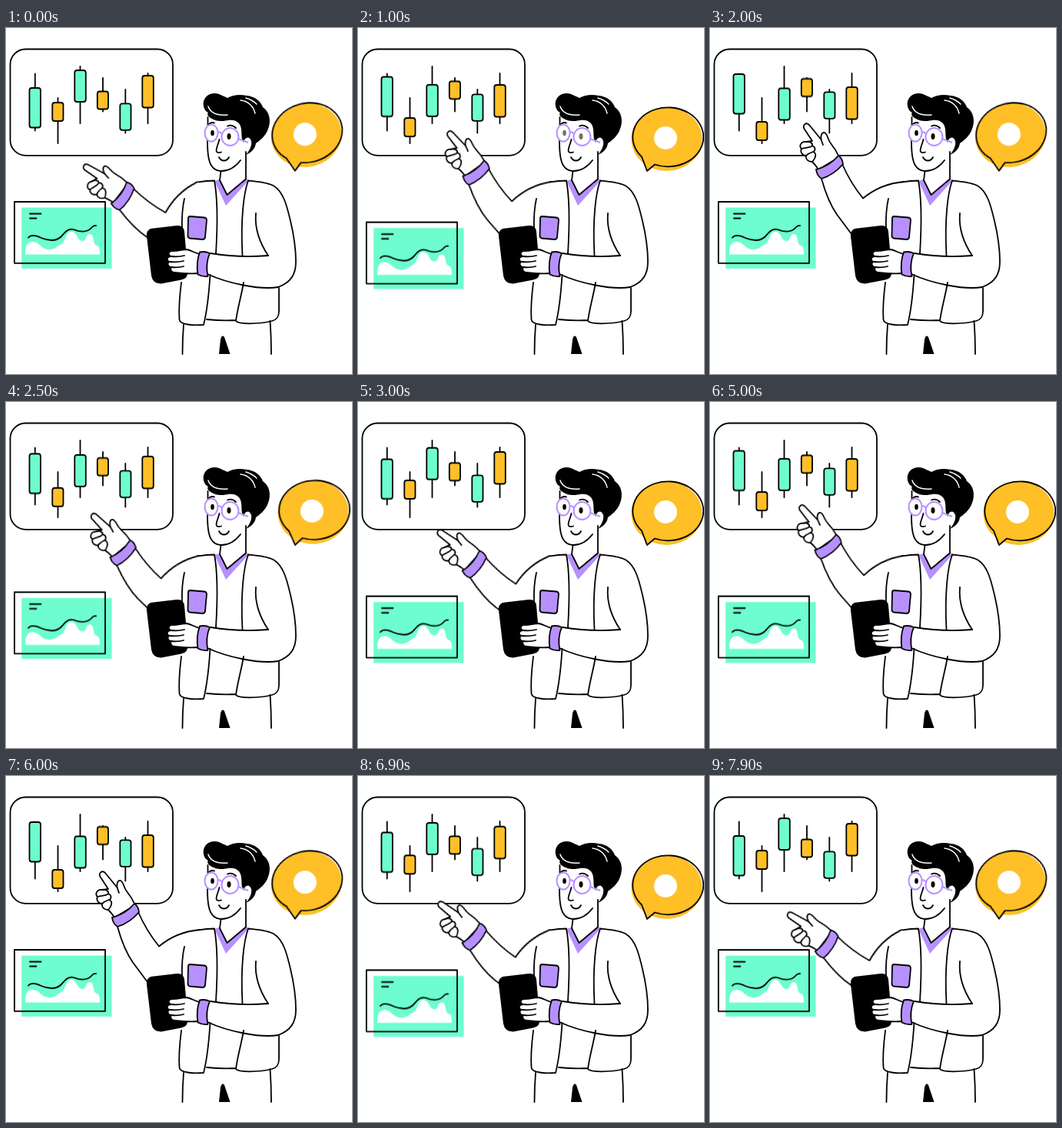
Write an HTML page that moves like this. It is 450 by 450 pixels and loops after 8000 ms.

```html
<!DOCTYPE html>
<html lang="en">
<head>
<meta charset="utf-8">
<title>Market analyst</title>
<style>
html, body { margin: 0; width: 100%; height: 100%; overflow: hidden; background: #fff; }
svg { display: block; width: 100%; height: 100%; }
.ink { fill: none; stroke: #000; stroke-width: 1.8; stroke-linecap: round; stroke-linejoin: round; }
.paper { fill: #fff; }
.green { fill: #6dfdcf; }
.gold { fill: #ffbf27; }
.lilac { fill: #b790ff; }
.rim { fill: none; stroke: #b790ff; stroke-width: 2; }
.shine { fill: none; stroke: #fff; stroke-width: 1.5; stroke-linecap: round; }

.body { animation: slide 4s ease infinite; }
.arm { animation: point 4s ease infinite; transform-origin: 251px 209px; }
.chart { animation: bob 2s ease infinite; }
.bubble { animation: sway 2s ease infinite; transform-origin: 375px 186px; }
.eyes { animation: blink 8s linear infinite; }

@keyframes slide { 50% { transform: translateY(var(--d)); } }
@keyframes point { 0%, 100% { transform: rotate(-22deg); } 50% { transform: none; } }
@keyframes bob { 50% { transform: translateY(26.6px); } }
@keyframes sway { 0%, 100% { transform: rotate(-14deg); } 50% { transform: none; } }
@keyframes blink { 0%, 11.3%, 13.7%, 100% { opacity: 1; } 12.5% { opacity: .55; } }
</style>
</head>
<body>
<svg viewBox="0 0 450 450">
  <rect class="ink" x="5.5" y="27.5" width="211.5" height="138.3" rx="20"/>

  <g class="ink">
    <path d="M37.8 59.5V133.5M67.5 91V150M96.5 50V124M126 65V108.5M155.3 80V136.5M184.5 59V124"/>
    <rect class="body green" style="--d:-18px" x="30.5" y="78" width="14.5" height="51.5" rx="3"/>
    <rect class="body gold" style="--d:25px" x="60.3" y="97" width="14.2" height="24" rx="3"/>
    <rect class="body green" style="--d:23.5px" x="89.3" y="55" width="14.5" height="41" rx="3"/>
    <rect class="body gold" style="--d:-16.5px" x="118.8" y="82.5" width="14.2" height="23" rx="3"/>
    <rect class="body green" style="--d:-15px" x="148.3" y="98.3" width="14.2" height="34.5" rx="3"/>
    <rect class="body gold" style="--d:15px" x="177.3" y="62" width="14.5" height="41.500" rx="3"/>
  </g>

  <g class="chart">
    <rect class="green" x="20.3" y="233.5" width="117.2" height="79.3"/>
    <path class="paper" d="M25 294.5V290C26 281 30 277 36 278C44 279 46 288 56 288C64 288 66 284 72 281C79 276 77 265 85 265C93 265 92 277 100 277C105 277 103 268 109 268C116 268 112 283 119 283Q122 284 122 294.5Z"/>
    <path class="ink" d="M11 226H129V305.800H11ZM31 241.500H45.500M31 247.500H39.500M29 272.500C33 268 40 270 46 273C56 277 65 278 72 271C77 265 81 260 88 262C95 265 101 266 107 263C112 261 112 256 117 257"/>
  </g>

  <g class="bubble">
    <ellipse class="gold" cx="401.500" cy="144.500" rx="46" ry="41.500"/>
    <path class="gold" d="M368 160L375 186L390 176Z"/>
    <path class="ink" d="M369 167.500L376 186L386 177.500A46 38.500 0 1 0 369 167.500"/>
    <circle class="paper" cx="400" cy="143" r="15"/>
  </g>

  <!-- legs -->
  <path class="ink" d="M231 386C230 398 229.500 410 229.500 424M343.500 381Q345 402 345 424"/>
  <path d="M277 424L279 405Q281 398 284 402L291.500 424Z"/>

  <!-- neck and head -->
  <path class="lilac" d="M271 199L277 197L287.500 217L311 196L316 198L286 231Z"/>
  <path class="ink" d="M279.500 186L278 198L287.500 217L312 196.500V161"/>
  <path class="ink" d="M262.500 116V126M262 147C262 155 262 163 264 171C266 180 271 185.500 280 186C290 186 299 180 305 172"/>
  <path d="M257 102C255 91 263 84 273 85C279 86 283 89 288 91C295 87 304 86 313 88C324 89 331 95 334 103C343 109 345 121 341 131C338 141 329 147 325 150C324 157 319 162 312 165C317 159 320 153 319 147C316 139 310 143 309 149C304 142 309 132 303 124C297 118 290 120 283 121C270 122 259 114 263 110C259 108 258 105 257 102Z"/>
  <path class="shine" d="M263 102C266 111 276 114 288 113M305 94C315 95 322 102 324 111M312 91C319 93 323 96 326 99"/>
  <path class="ink" d="M277.500 145C276 152 272 158 274 161C275 162.500 278 162 280 161.500M277 168C280 174 287 174 290 168M264 125Q267 122 271 123.500M288 127.500Q294 125 299 130"/>
  <g class="eyes">
    <ellipse cx="268.500" cy="136.500" rx="2.300" ry="3.800"/>
    <ellipse cx="290" cy="141" rx="2.500" ry="4"/>
  </g>
  <g class="rim">
    <ellipse cx="267" cy="136.500" rx="8.500" ry="11"/>
    <ellipse cx="291.500" cy="141.500" rx="11" ry="11.500"/>
    <path d="M275.500 136Q278 134 281 138M302 144L315 149"/>
  </g>

  <!-- pointing arm -->
  <g class="arm">
    <path class="paper" d="M145 196C150 214 157 231 165 242.500L190 276L232 270L247 200C228 204 212 211 199 221.500L172 177Z"/>
    <path class="ink" d="M145 196C150 214 157 231 165 242.500L190 276M172 177C179 193 188 208 199 221.500C213 210 229 202 252 200"/>
    <path class="ink" style="fill:#fff" d="M141 184C138 179 136 177 133 174C128 174 124 171 125 166C120 166 117 161 119 157C115 153 119 147 125 148L133 147L122.500 131C120 126 125 122 129 126L144.500 145C144 140 145 135.500 149 136C153 138 153 145 157 150C162 156 165 161 168 168Z"/>
    <path class="ink" d="M125 148C130 147 134 150 133 153C131 156 125 155 119 157M133 153C138 155 137 160 134 161C131 162 128 163 125 166M134 161C139 163 138 168 133 174M144.500 145L147 152"/>
    <path class="ink" style="fill:#b790ff" d="M138 184Q155 180 167 166Q172 169 173 177Q161 191 145 196Q139 192 138 184Z"/>
  </g>

  <!-- jacket -->
  <g class="ink">
    <path d="M250 200.300C258 199 265 198.500 271 198.500C276 225 275 260 273 293M315 198.500C328 200 341 201 348.500 205.500C362 214 366 235 370 251C374 268 377 288 377 304C377 321 370 331 354 337M315 198.500C309 215 305 250 307.500 296"/>
    <path d="M232 222C229 235 228.500 247 229 262M325 241C323 263 331 281 341 296"/>
    <path d="M228 331C226 347 224.500 365 225.500 379C226 386 243 387 257 386C262 366 264 345 265.500 321M309 331C306 349 301 365 299 381C303 386 330 385 346 381C353 379 355 375 355 368V338M261 379Q280 381 299 380"/>
    <path d="M266 293C290 297 316 298 341 296M354 337C330 341 288 332 262 320"/>
    <path style="fill:#b790ff" d="M239.500 245L258 246.500Q261 247 261 250L259 272Q258.500 275 255.500 275L239 273.500Q236.500 273 236.500 270L237 247.500Q237 245 239.500 245Z"/>
  </g>

  <!-- tablet and holding hand -->
  <path d="M192 260.500L222 257Q231 256 232 265L236.500 316Q237 326 228 327.500L202 332.500Q191 333 189 322L183 271Q182 261 192 260.500Z"/>
  <g class="ink">
    <path style="fill:#fff" d="M252 294C246 293 241 289 235 288C228 288 222 291 215 290C210 291 211 296 215 297C209 297 208 303 213 304C209 305 210 311 215 311C213 314 215 318 220 318C230 319 239 320 250 319Z"/>
    <path d="M215 297Q224 298 232 296M213 304Q223 305 231 303M215 311Q224 312 231 310"/>
    <path style="fill:#b790ff" d="M252 291.500Q259 290 265 293Q259 307 262.500 323Q256 324 249.500 320.500Q247 305 252 291.500Z"/>
  </g>
</svg>
</body>
</html>
```
